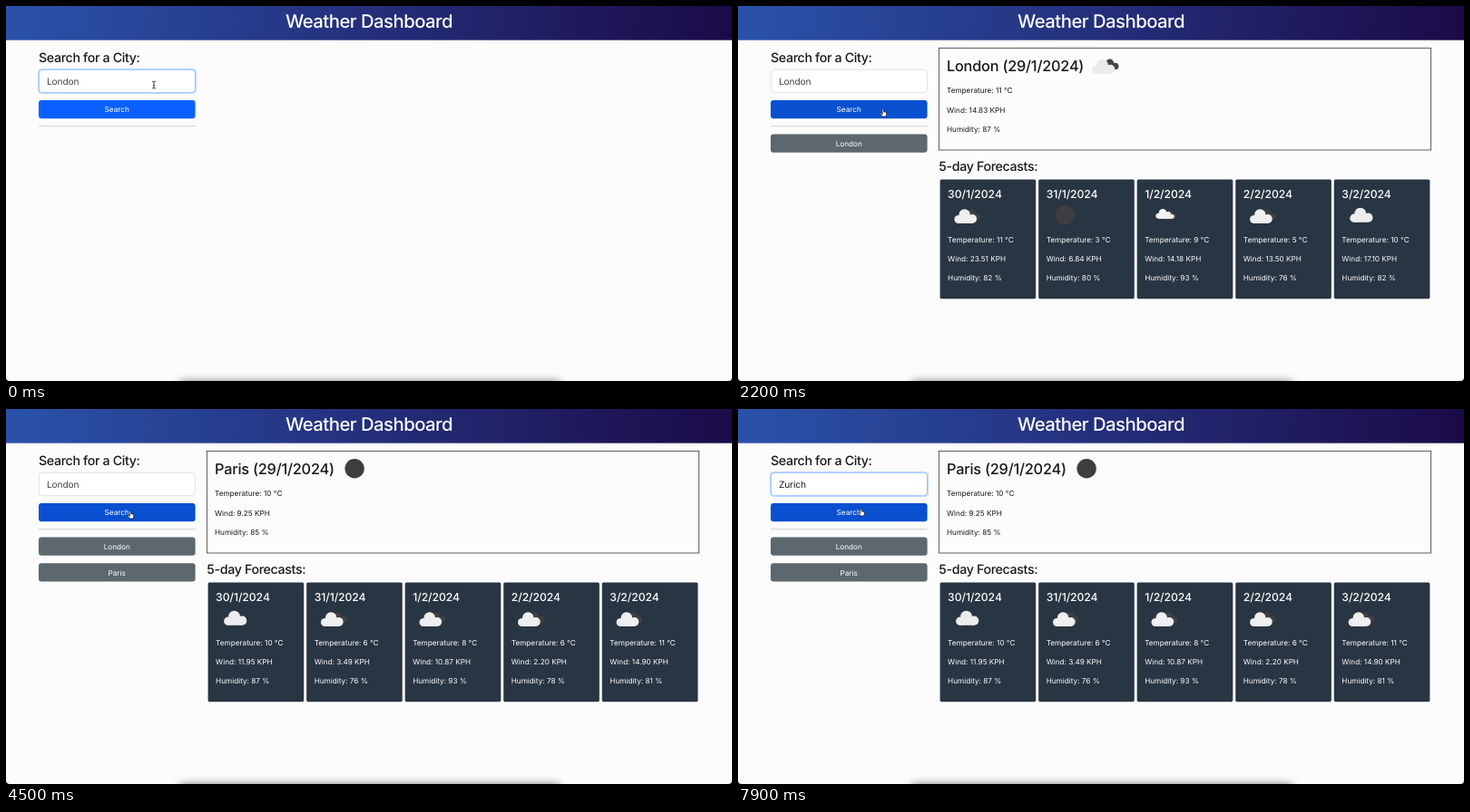
An HTML page that plays this animation: 800x414 px, repeating every 8000 ms.

```html
<!DOCTYPE html>
<html lang="en">
<head>
<meta charset="utf-8">
<title>Weather Dashboard</title>
<style>
html, body { margin: 0; width: 100%; height: 100%; overflow: hidden; background: #fcfcfc; }
svg { display: block; width: 800px; height: 414px; }
text { font-family: Inter, Roboto, sans-serif; font-size: 8.2px; fill: #16191c; text-rendering: geometricPrecision; }
.h1 { font-size: 20.3px; font-weight: 500; letter-spacing: -.026em; fill: #fff; }
.h2 { font-size: 16.3px; font-weight: 500; letter-spacing: -.013em; }
.h3 { font-size: 14.2px; font-weight: 500; letter-spacing: -.024em; }
.h4 { font-size: 12.2px; font-weight: 500; letter-spacing: -.005em; }
.field { font-size: 10.2px; letter-spacing: -.015em; }
.mid { text-anchor: middle; }
.light text, .btn { fill: #fff; }
</style>
</head>
<body>
<svg viewBox="0 0 800 414">
  <defs>
    <linearGradient id="bar">
      <stop offset="0" stop-color="#2a52aa"/>
      <stop offset=".5" stop-color="#242f7b"/>
      <stop offset="1" stop-color="#1b0a47"/>
    </linearGradient>
    <filter id="soft" x="-10%" y="-300%" width="120%" height="700%"><feGaussianBlur stdDeviation="5"/></filter>
    <g id="cloud">
      <circle cx="4.8" cy="-4.5" r="4.5"/>
      <circle cx="11.5" cy="-9.6" r="6.2"/>
      <circle cx="20" cy="-5" r="5"/>
      <rect x="4.8" y="-8" width="15.2" height="8"/>
    </g>
  </defs>
  <rect width="800" height="414" fill="#fcfcfc"/>
  <rect width="800" height="37.7" fill="url(#bar)"/>
  <text class="h1 mid" x="400" y="24">Weather Dashboard</text>

  <text class="h3" x="36" y="62.3">Search for a City:</text>
  <rect id="ring" x="34.9" y="68.9" width="175.2" height="28.2" rx="5" fill="#c2d9ff"/>
  <rect id="box" x="36.3" y="70.3" width="172.2" height="25.4" rx="4" fill="#fff" stroke-width=".8"/>
  <text id="typed" class="field" x="45" y="87"></text>
  <rect id="caret" y="77.5" width=".8" height="11.5" fill="#000"/>
  <rect id="search" x="36" y="104" width="172.6" height="20.2" rx="3.2"/>
  <text class="btn mid" x="122.2" y="117.2">Search</text>
  <rect x="36" y="132.4" width="172.6" height=".8" fill="#c3c5c7"/>
  <g id="history"></g>
  <g id="reports"></g>

  <rect x="192" y="414" width="418" height="14" filter="url(#soft)" opacity=".5"/>
  <path d="M0 410Q0 414 4 414H0ZM800 410Q800 414 796 414H800Z"/>
  <g id="pointer" stroke-linejoin="round" stroke-linecap="round">
    <path id="beam" d="M-1.7-3.8Q0-3.8 0-2.8Q0-3.8 1.7-3.8M0-2.8V3M-1.7 4Q0 4 0 3Q0 4 1.7 4M-.8.8H.8" fill="none" stroke="#222" stroke-width=".8"/>
    <path id="hand" d="M-1.6-3.4Q-.8-4.6-.1-3.2L.3-1Q1-1.6 1.5-.8Q2.2-1.2 2.6-.4Q3.5-.5 3.4.7L3 2.6L2.5 4H-1.2L-3.2 1.2Q-3.7 0-2.6.2L-1.2 1.2Z" fill="#fff" stroke="#111" stroke-width=".7"/>
    <path id="arrow" d="M-2-4V3L-.4 1.6L.7 4L1.9 3.5L.9 1.2H3Z" fill="#111" stroke="#fff" stroke-width=".6"/>
  </g>
</svg>
<script>
const LOOP = 8000;
const $ = id => document.getElementById(id);
const clamp = v => Math.max(0, Math.min(1, v));
const ease = v => v * v * (3 - 2 * v);
const show = (el, on) => el.setAttribute('visibility', on ? 'visible' : 'hidden');
const text = (x, y, s, cls = '') => `<text class="${cls}" x="${x}" y="${y}">${s}</text>`;

// Weather icons; (x, y) is the left end of the cloud's base
const cloud = (x, y, k, fill) => `<use href="#cloud" transform="translate(${x} ${y}) scale(${k})" fill="${fill}"/>`;
const icons = {
  broken: (x, y) => cloud(x + 11, y - 4.2, .72, '#403f42') + cloud(x, y, 1, '#efefef'),
  rain: (x, y) => cloud(x + 13, y - 4.6, .62, '#403f42') + cloud(x + 9.5, y - 5.2, .46, '#efefef') +
    cloud(x + 5, y - 5.2, .68, '#f4f4f4') + cloud(x + 13, y - 5.2, .5, '#efefef'),
  cloudy: (x, y) => cloud(x + 1.7, y - 1.2, 1.02, '#ededed'),
  clear: (x, y) => `<circle cx="${x + 13.7}" cy="${y - 9.4}" r="10.7" fill="#3e3d40"/>`
};

const stats = (x, y, [temp, wind, hum]) =>
  text(x, y, `Temperature: ${temp} °C`) +
  text(x, y + 21.2, `Wind: ${wind} KPH`) +
  text(x, y + 42.4, `Humidity: ${hum} %`);

const days = ['30/1/2024', '31/1/2024', '1/2/2024', '2/2/2024', '3/2/2024'];

function card(day, i) {
  const x = 222.6 + i * 108.55;
  return `<g class="light"><rect x="${x}" y="191.4" width="105.6" height="131.8" rx="1.6" fill="#283542"/>` +
    text(x + 8.5, 212.2, days[i], 'h4') +
    icons[day[3]](x + 15.5, 240) +
    stats(x + 8.5, 260.8, day) + '</g>';
}

function report(city, now, icon, week) {
  return `<g visibility="hidden">
    <rect x="221.4" y="46.4" width="542.2" height="112.6" fill="none" stroke="#4a4c4e" stroke-width=".9"/>` +
    text(230, 71.8, `${city} (29/1/2024)`, 'h2') + icon + stats(230, 96.4, now) +
    text(221.3, 182, '5-day Forecasts:', 'h3') + week.map(card).join('') + '</g>';
}

$('reports').innerHTML =
  report('London', ['11', '14.83', '87'],
    cloud(401.5, 70, .72, '#454447') + cloud(389.8, 75, 1.02, '#ebebeb'), [
      ['11', '23.51', '82', 'broken'], ['3', '6.84', '80', 'clear'], ['9', '14.18', '93', 'rain'],
      ['5', '13.50', '76', 'broken'], ['10', '17.10', '82', 'cloudy']]) +
  report('Paris', ['10', '9.25', '85'], icons.clear(370.4, 75.2), [
      ['10', '11.95', '87', 'cloudy'], ['6', '3.49', '76', 'broken'], ['8', '10.87', '93', 'broken'],
      ['6', '2.20', '78', 'broken'], ['11', '14.90', '81', 'broken']]);

$('history').innerHTML = ['London', 'Paris'].map((city, i) =>
  `<g><rect x="36" y="${141.6 + i * 28.7}" width="172.6" height="20.2" rx="3.2" fill="#5c676e"/>` +
  text(122.2, 154.8 + i * 28.7, city, 'btn mid') + '</g>').join('');

const [london, paris] = $('reports').children;
const [pastLondon, pastParis] = $('history').children;

// One entry per search: focus and blur times, word, time of each key
const searches = [
  { focus: -600, blur: 1780, word: 'London', keys: [400, 550, 700, 850, 1000, 1100] },
  { focus: 2550, blur: 4340, word: 'Paris', keys: [2920, 3060, 3220, 3360, 3500] },
  { focus: 5120, blur: 9000, word: 'Zurich', keys: [5480, 5720, 5880, 6020, 6160, 6300] }
];

// Pointer stops: time, x, y
const stops = [
  [0, 163, 87], [1300, 163, 87], [1650, 161, 120], [2150, 161, 120], [2500, 150, 86],
  [3650, 150, 86], [4100, 137.5, 117], [4700, 137.5, 117], [5050, 141, 86],
  [6950, 141, 86], [7450, 136, 114], [8000, 136, 114]
];
const hidden = [[400, 1300], [2920, 3650], [5480, 6950]];
const hovers = [[1440, 2290], [3900, 4840], [7250, 8200]];

const within = (t, [a, b]) => t >= a && t < b;
const fade = (t, a, b, d = 150) => ease(clamp((t - a) / d)) * (1 - ease(clamp((t - b) / d)));
const mix = (a, b, k) => `rgb(${a.map((v, i) => Math.round(v + (b[i] - v) * k))})`;

function pointerAt(t) {
  const i = Math.max(1, stops.findIndex(s => s[0] > t));
  const [a, b] = [stops[i - 1], stops[i]];
  const k = ease(clamp((t - a[0]) / (b[0] - a[0])));
  return [a[1] + (b[1] - a[1]) * k, a[2] + (b[2] - a[2]) * k];
}

function drawField(t) {
  const s = searches.find(q => within(t, [q.focus, q.blur]));
  const pressed = s ? s.keys.filter(k => k <= t) : [];
  const word = s ? s.word.slice(0, pressed.length) : '';
  const field = $('typed');
  field.textContent = word || 'London';
  field.style.fill = word ? '#16191c' : '#41464b';

  const glow = Math.max(...searches.map(q => fade(t, q.focus, q.blur)));
  $('ring').setAttribute('opacity', glow);
  $('box').setAttribute('stroke', mix([216, 220, 225], [134, 183, 254], glow));

  const since = s ? t - (pressed.length ? pressed[pressed.length - 1] : s.focus) : 0;
  show($('caret'), s && since % 1000 < 500);
  $('caret').setAttribute('x', 45 + (word ? field.getComputedTextLength() : 0));
}

function drawPointer(t) {
  const [x, y] = pointerAt(t);
  const visible = !hidden.some(h => within(t, h));
  const kind = y > 103 ? 'hand' : y < 96.5 ? 'beam' : 'arrow';
  $('pointer').setAttribute('transform', `translate(${x} ${y})`);
  for (const id of ['hand', 'beam', 'arrow']) show($(id), visible && id === kind);
  const hover = Math.max(...hovers.map(([a, b]) => fade(t, a, b)));
  $('search').setAttribute('fill', mix([10, 96, 255], [9, 80, 209], hover));
}

function draw(t) {
  drawField(t);
  drawPointer(t);
  show(pastLondon, t >= 1820);
  show(pastParis, t >= 4420);
  show(london, within(t, [2000, 4420]));
  show(paris, t >= 4420);
}

function tick() {
  draw(performance.now() % LOOP);
  requestAnimationFrame(tick);
}
tick();
</script>
</body>
</html>
```
